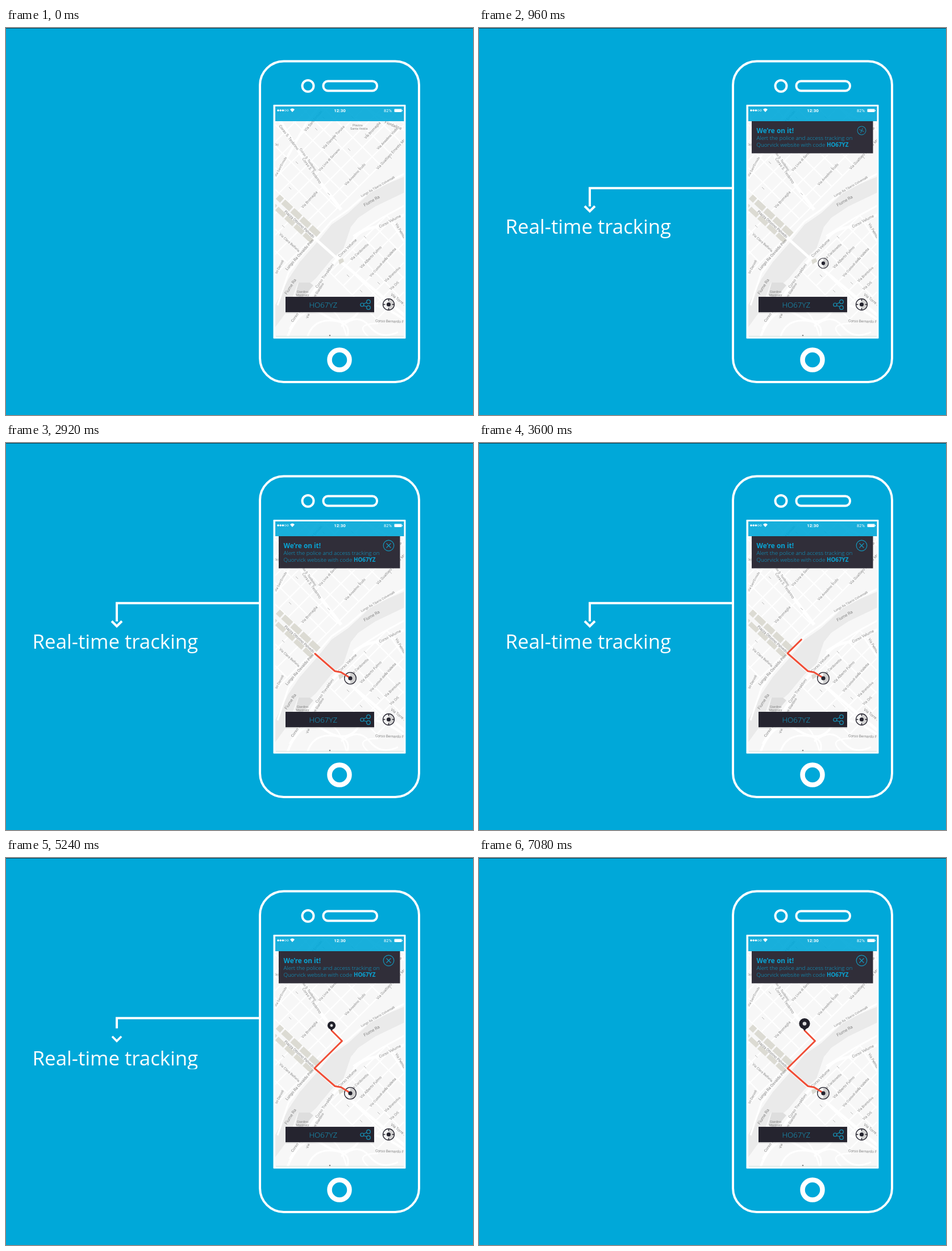
An HTML page that plays this animation: 822 px wide and 681 px high, repeating every 7.28 s.

```html
<!DOCTYPE html>
<html lang="en">
<head>
<meta charset="utf-8">
<title>Real-time tracking</title>
<style>
  html, body { margin: 0; width: 100%; height: 100%; overflow: hidden; background: #00a8d9; }
  svg { display: block; width: 822px; height: 681px; font-family: "Open Sans", sans-serif; }
  .line { fill: none; stroke: #fff; stroke-width: 4; }
  .cyan { fill: none; stroke: #1497bd; stroke-width: 1.2; }
  #roads path, #banks path { fill: none; stroke: #fff; stroke-linejoin: round; }
  #labels, .status { font-family: Roboto, sans-serif; }
  #labels { fill: #858585; }
  .light { font-weight: 300; }
  .bold { font-weight: 700; }
</style>
</head>
<body>
<svg viewBox="0 0 822 681">
  <defs>
    <clipPath id="screen"><rect x="474" y="138" width="226.500" height="405.500"/></clipPath>
    <clipPath id="mask"><rect x="40" y="327" width="310" height="44.500"/></clipPath>
    <clipPath id="reveal"><rect id="shade" x="480" y="164" width="214" height="57"/></clipPath>
  </defs>
  <rect width="822" height="681" fill="#00a8d9"/>
  <rect width="822" height="1" fill="#0b4257"/>

  <rect class="line" x="447" y="58.500" width="280" height="564.500" rx="42"/>
  <circle class="line" cx="531.500" cy="102" r="10"/>
  <rect class="line" x="558.500" y="93.500" width="94.500" height="17" rx="8"/>
  <circle class="line" cx="587" cy="584" r="17.500" style="stroke-width:8.5"/>
  <rect x="470.500" y="135" width="233" height="411.500" rx="1" fill="#fff"/>

  <g clip-path="url(#screen)">
    <rect x="474" y="138" width="227" height="406" fill="#f7f7f7"/>
    <g id="roads"></g>
    <path fill="#eaeaea" d="M470 495 497 442 517 412 552 372 573 346 602 326 640 291 672 274 702 261V289L650 314 620 334 607 350 594 388 573 407 545 441 537 448H514L505 472 491 503 470 532Z"/>
    <path fill="#dedede" d="M515 448H535L541 453 530 466 520 475 509 470Z"/>
    <g id="banks"></g>
    <g id="plaza" fill="#dcdbd3" transform="translate(482 312) rotate(43)"></g>
    <path fill="#dcdbd3" d="M585 408 593 405 595 411 587 416Z"/>
    <g id="ticks" stroke="#aaa" stroke-width=".8"></g>
    <g id="labels"></g>
    <path d="M475 542.500H700" stroke="#c9dfd6" stroke-width=".8"/>
    <circle cx="570" cy="541" r="1.300" fill="#888"/>
    <rect x="474" y="138" width="227" height="26" fill="#00a8d9" opacity=".9"/>
  </g>

  <g class="status" fill="#fff" font-size="7.500">
    <circle cx="479" cy="145" r="1.800"/><circle cx="483.200" cy="145" r="1.800"/><circle cx="487.400" cy="145" r="1.800"/>
    <g fill="none" stroke="#fff" stroke-width=".6"><circle cx="491.600" cy="145" r="1.500"/><circle cx="495.800" cy="145" r="1.500"/></g>
    <path d="M500 143.500Q504 139.500 508 143.500L504 148Z"/>
    <text x="587.500" y="147.800" font-size="8" font-weight="700" text-anchor="middle">12:30</text>
    <text x="665" y="147.800">82%</text>
    <rect x="683.500" y="142.500" width="13" height="5.500" rx="1"/><rect x="697" y="144" width="1" height="2.500"/>
  </g>

  <rect x="492" y="474" width="156" height="28" fill="#000" opacity=".15"/>
  <rect x="492" y="473" width="156" height="27" fill="#25242f"/>
  <text class="light" x="533.500" y="491.500" font-size="13.300" fill="#14a0c8">HO67YZ</text>
  <g class="cyan">
    <path d="M629.500 485.500 635 483M629.500 488.500 635 490.500"/>
    <circle cx="626.800" cy="487" r="3"/><circle cx="638" cy="481.700" r="3.300"/><circle cx="638" cy="492" r="3.300"/>
  </g>
  <g transform="translate(673.500 486.500)">
    <circle r="10" fill="#f4f4f4"/><path d="M0-10A10 10 0 0 1 0 10Z" fill="#d2d2d2"/>
    <circle r="10" fill="none" stroke="#25242f" stroke-width="1.300"/><circle r="3.600" fill="#25242f"/>
    <path d="M0-10V-6M0 6V10M-10 0H-6M6 0H10" stroke="#25242f" stroke-width="1.300"/>
  </g>

  <g id="banner" clip-path="url(#reveal)">
    <rect x="480" y="164" width="213.500" height="56.500" fill="#302e39"/>
    <g id="notice" fill="#08a5d5">
      <text class="bold" x="488.500" y="185" font-size="11.800">We’re on it!</text>
      <text class="light" x="488.500" y="197" font-size="9.850">Alert the police and access tracking on</text>
      <text class="light" x="488.500" y="208.500" font-size="9.850">Quorvick website with code <tspan class="bold">HO67YZ</tspan></text>
    </g>
    <g id="close" class="cyan"><circle r="9.300"/><path d="M-4-4 4 4M4-4-4 4"/></g>
  </g>

  <g id="pulse" fill="#f04e37"><circle r="1" opacity=".12"/><circle r=".5" opacity=".24"/></g>
  <g id="marker">
    <circle r="10.300" fill="#f7f7f7"/><path d="M0-10A10 10 0 0 1 0 10Z" fill="#cfcfcf"/>
    <circle r="10.300" fill="none" stroke="#25242f" stroke-width="1.300"/>
  </g>
  <path id="route" d="M606 413.500 590 403.500 579 401.500 543 370 591.500 322 573 303.500" fill="none" stroke="#f04e37" stroke-width="3" stroke-linejoin="round" stroke-linecap="round"/>
  <circle id="dot" r="3.600" fill="#25242f"/>
  <g id="pin"><path d="M-3.500-4 0 0 3.500-4Z" fill="#20202a"/><circle cy="-12.500" r="9.600" fill="#20202a"/><circle cy="-12.500" r="3.300" fill="#fff" opacity=".85"/></g>

  <path id="lead" class="line" d="M446 281.700H195V314"/>
  <path id="arrow" class="line" d="M-9-5.500 0 3.500 9-5.500"/>
  <g clip-path="url(#mask)"><text id="title" x="46.600" y="362" font-size="34.800" fill="#fff">Real-time tracking</text></g>
</svg>
<script>
const $ = id => document.getElementById(id);
const range = (from, to, step) => Array.from({ length: Math.floor((to - from) / step) + 1 }, (_, i) => from + i * step);
const road = (d, width) => `<path d="${d}" stroke-width="${width}"/>`;

// Streets follow two diagonals: x + y = c and y - x = d.
const at = (c, d) => `${(c - d) / 2} ${(c + d) / 2}`;
const grid = (cs, ds, width) => {
  const [c0, c1, d0, d1] = [cs[0], cs.at(-1), ds[0], ds.at(-1)];
  return cs.map(c => road(`M${at(c, d0)}L${at(c, d1)}`, width)).join('') +
         ds.map(d => road(`M${at(c0, d)}L${at(c1, d)}`, width)).join('');
};
$('roads').innerHTML =
  grid([640, 674, 707, 738, 771, 803, 837, 871, 900], range(-570, -190, 38), 2.2) +
  grid([1000, 1016, 1047, 1079, 1113, 1137, 1165], range(-340, -140, 40), 2.2) +
  grid([800, 838, 872, 908], [-165, -120, -82, -40], 2.2) +
  road('M474 150 513 213 555 274 590 320', 6) +
  road('M474 265 530 165 550 140M640 145 702 180', 4) +
  road('M495 545Q520 480 560 505T620 500T702 514', 4) +
  road('M530 545Q540 512 575 515T600 545M590 525Q620 500 640 525T690 535', 3) +
  road('M545 490Q585 485 600 545M640 545Q610 520 655 520', 2.4);
$('banks').innerHTML =
  road('M478 488 497 431 517 404 552 364 573 340 602 320 640 287 702 256', 3) +
  road('M500 530 525 488 577 413 611 375Q620 353 660 349L702 328', 5) +
  road('M540 367 589 411 702 506', 5) +
  road('M676 340 702 378M611 366 660 335 702 312', 3);
$('plaza').innerHTML = [[-14, 10.5], [3.5, 8.5]].map(([y, h]) =>
  `<rect x="-13" y="${y}" width="10" height="${h}"/>` +
  range(0, 66, 22).map(x => `<rect x="${x}" y="${y}" width="19" height="${h}"/>`).join('')).join('');

const ticks = [[559, 158], [610, 157], [546, 178], [580, 196], [634, 188], [604, 214], [512, 237],
  [621, 247], [568, 292], [500, 282], [488, 349], [677, 228], [632, 368], [668, 406], [602, 436], [656, 449], [625, 463]];
$('ticks').innerHTML = ticks.map(([x, y]) => `<path d="M${x - 2} ${y - 2}l4 4"/>`).join('');

// x, y, angle, text, size
const labels = [
  [482, 171, 53, 'Corso S. Teobrino'], [518, 212, 55, 'Corso S. Teobrino', 6], [523, 229, 55, 'Corso S. Teobrino'],
  [526, 181, -50, 'Via Sant’Ermido', 6.5], [558, 212, -47, 'Via Daniele Torusa', 6.5],
  [551, 251, -47, 'Via Livia di Sorvano', 6], [632, 194, -47, 'Via Bromaglia', 6.2], [521, 316, -47, 'Via Bromaglia', 6.2],
  [597, 276, -47, 'Via Anselmo Vodo', 6.2], [654, 213, -47, 'Via Anselmo Vodo', 6.2],
  [653, 248, -47, 'Via Gualtiero Ernesto Mavolli', 6.5], [474, 261, -61, 'Via Sant’Ermido', 5.5],
  [667, 165, 22, 'Fiordalina', 7.2], [610, 171, 0, 'Piazza', 6], [606, 177, 0, 'Santa Veldia', 5.5],
  [625, 296, -30, 'Lungo Ra Tiberio Colventalli', 5.5], [630, 312, -30, 'Fiume Ra', 7.5], [492, 468, -57, 'Fiume Ra', 7.5],
  [657, 350, -28, 'Corso Velume', 6.8], [586, 402, -45, 'Corso Velume', 6.8], [607, 408, -43, 'Via Cardonetto', 6.2],
  [624, 422, -46, 'Via Alberto Fulmo', 6.5], [641, 437, -48, 'Via Custodi della Valletta', 6],
  [667, 446, -44, 'Via Brentolvo', 6.2], [676, 460, -42, 'Via Orli', 6.2], [678, 468, 38, 'Via Torre s', 6.8],
  [650, 515, 2, 'Corso Bernardo Fi', 6.5], [546, 457, -55, 'Corso Trevaldoni', 6.8],
  [491, 322, 42, 'Piazza Ottorino Palvedo', 6.5], [482, 362, 42, 'Via Clara Belforia', 6],
  [493, 425, -48, 'Lungo Ra Osvaldo Prin', 7], [475, 432, -62, 'so Dervoli', 6],
  [512, 464, 0, 'Giardino', 5.5], [511, 470, 0, 'Montvelz', 5.5], [540, 477, -57, 'ove Giardino', 6],
  [687, 344, 60, 'Via Pelmor', 6.2], [503, 517, -55, 'Corso Trev', 6.8], [530, 511, -75, 'Via', 6], [473, 204, 15, 'ori', 6],
];
$('labels').innerHTML = labels.map(([x, y, a, text, size = 6.8]) =>
  `<text transform="translate(${x} ${y}) rotate(${a})" dy=".35em" font-size="${size}">${text}</text>`).join('');

const LOOP = 7280, STEP = 40;
const part = (t, from, to) => Math.min(1, Math.max(0, (t - from) / (to - from)));
const easeIn = u => u * u;
const easeOut = u => 1 - (1 - u) ** 3;
const set = (id, attrs) => { for (const k in attrs) $(id).setAttribute(k, attrs[k]); };
const place = (id, x, y, scale, turn = 0) =>
  set(id, { transform: `translate(${x} ${y}) rotate(${turn}) scale(${scale})`, visibility: scale > 0 ? 'visible' : 'hidden' });
const trace = (id, share) => {
  const len = $(id).getTotalLength();
  set(id, { 'stroke-dasharray': `${len * share} ${len + 10}`, visibility: share > 0 ? 'visible' : 'hidden' });
  return $(id).getPointAtLength(len * share);
};

function draw(t) {
  const leave = easeIn(part(t, 5060, 5860));
  trace('lead', easeOut(part(t, 0, 560)) - leave);
  place('arrow', 195, 319, easeOut(part(t, 400, 760)) - easeIn(part(t, 5060, 5620)));
  set('title', { y: 362 + 55 * (1 - easeOut(part(t, 400, 900)) + leave) });

  set('shade', { height: 57 * easeOut(part(t, 0, 520)) });
  set('notice', { opacity: part(t, 320, 800) });
  const close = easeOut(part(t, 760, 1240));
  place('close', 673.5, 180.5, close, -100 * (1 - close));

  const grow = easeOut(part(t, 740, 1180));
  place('marker', 606, 414, grow);
  place('dot', 606, 414, grow);

  const head = trace('route', part(t, 1450, 4750));
  const beat = t < 1840 ? 1 : Math.min(1, (t - 1840) % 680 / 400);
  place('pulse', head.x, head.y, beat < 1 ? 38 * Math.sin(Math.PI * beat) : 0);
  place('pin', 573, 304, easeOut(part(t, 5080, 5520)));
}

const start = performance.now();
function tick() {
  const t = (performance.now() - start) % LOOP;
  draw(Math.floor(t / STEP) * STEP);
  requestAnimationFrame(tick);
}
tick();
</script>
</body>
</html>
```
